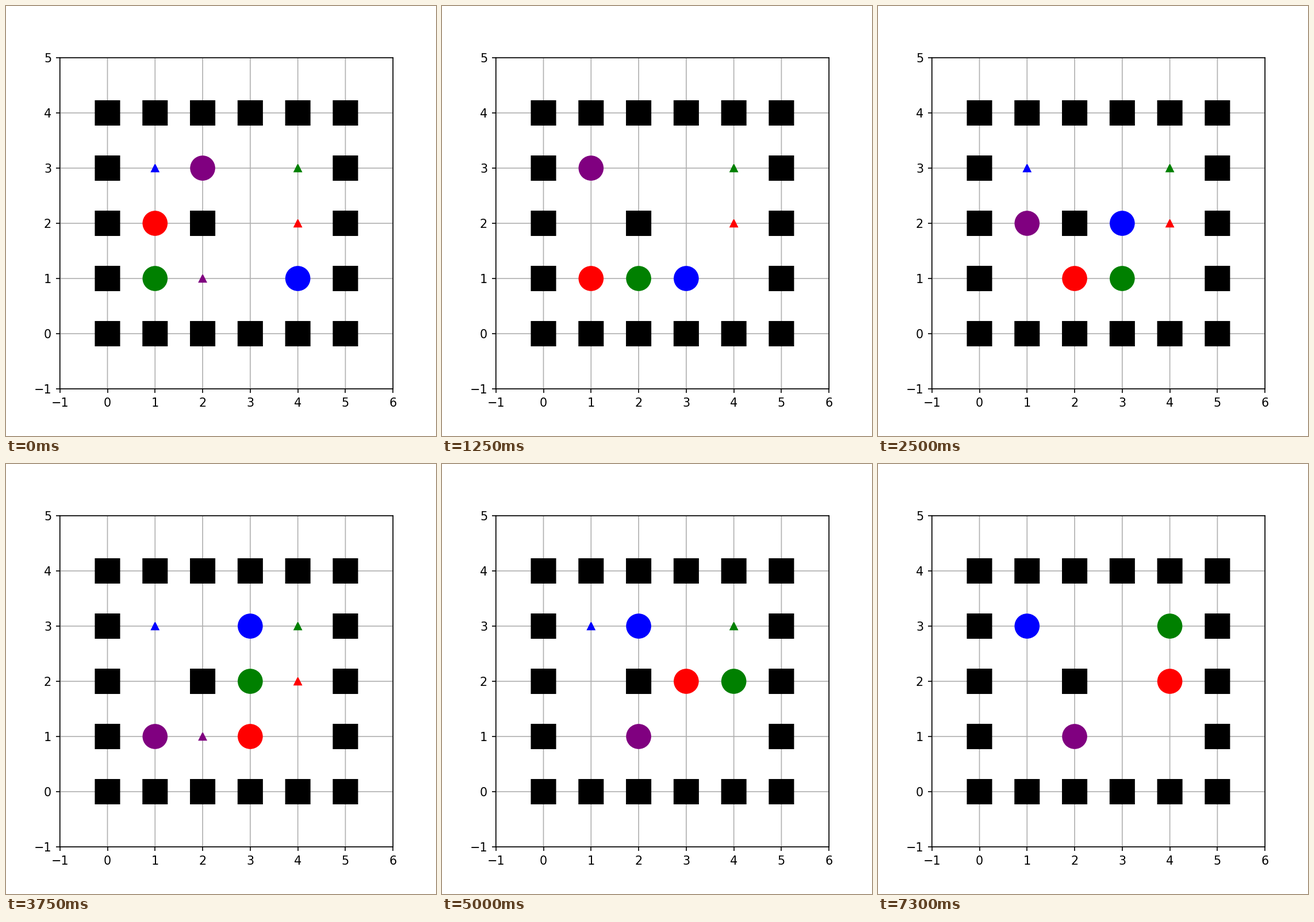
A matplotlib script that plays this animation: 748 by 748 pixels, repeating every 8 s.

```python
from itertools import accumulate

import matplotlib.pyplot as plt
from matplotlib.animation import FuncAnimation

SIZE = 748
STEP_MS, TICK_MS, LOOP_MS = 1250, 250, 8000
COLS, ROWS = 6, 5

MOVES = {"U": 1j, "D": -1j, "L": -1, "R": 1, "-": 0}

# Agent colour: start cell and one move per step.
AGENTS = {
    "red": (1 + 2j, "DRRUR"),
    "green": (1 + 1j, "RRURU"),
    "blue": (4 + 1j, "LUULL"),
    "purple": (2 + 3j, "LDDR-"),
}


def walk(start, moves):
    """Cells visited from start, as (x, y) pairs."""
    cells = accumulate((MOVES[m] for m in moves), initial=start)
    return [(cell.real, cell.imag) for cell in cells]


def draw_cells(cells, marker, size, colors, zorder):
    return ax.scatter(*zip(*cells), s=size ** 2, marker=marker, c=colors,
                      linewidths=1, joinstyle="miter", zorder=zorder)


paths = [walk(*agent) for agent in AGENTS.values()]
poses = list(zip(*paths))
colors = list(AGENTS)
walls = [(x, y) for x in range(COLS) for y in range(ROWS)
         if x in (0, COLS - 1) or y in (0, ROWS - 1)] + [(2, 2)]

# Keep lines and markers at their exact subpixel places.
plt.rcParams["path.snap"] = False

fig, ax = plt.subplots(figsize=(5, 5), dpi=SIZE / 5)
fig.subplots_adjust(left=0.1253, right=0.9, bottom=82 / SIZE, top=658 / SIZE)
ax.set_xlim(-1, COLS)
ax.set_ylim(-1, ROWS)
ax.set_xticks(range(-1, COLS + 1))
ax.set_yticks(range(-1, ROWS + 1))
ax.set_axisbelow(True)
ax.grid(True)

draw_cells(walls, "s", 20.2, ["black"] * len(walls), 2)
draw_cells(poses[-1], "^", 6, colors, 2)
agents = draw_cells(poses[0], "o", 20, colors, 3)


def update(frame):
    step = min(frame * TICK_MS // STEP_MS, len(poses) - 1)
    agents.set_offsets(poses[step])
    return [agents]


anim = FuncAnimation(fig, update, frames=LOOP_MS // TICK_MS,
                     interval=TICK_MS, repeat=True)
plt.show()
```
